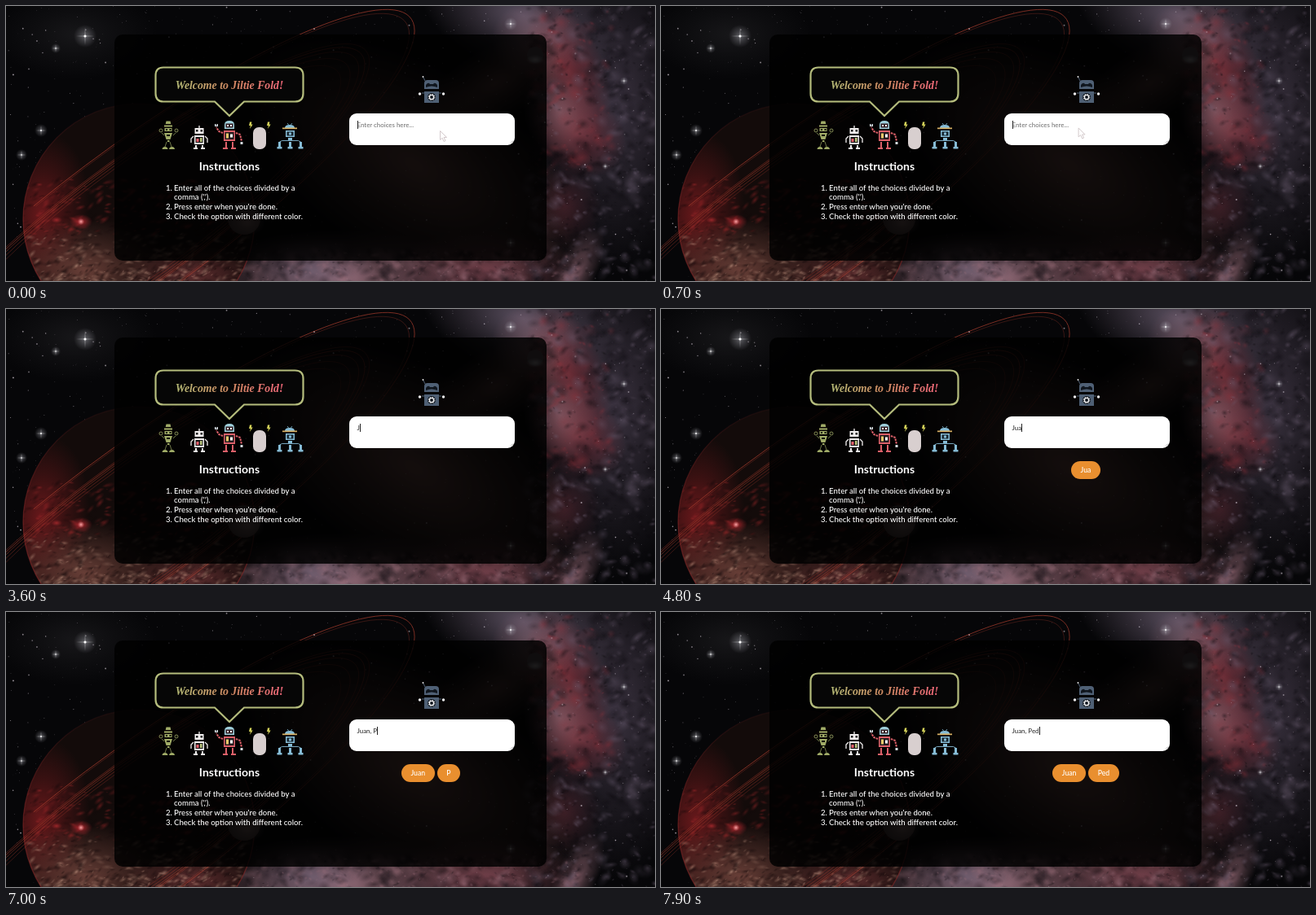
An HTML page with a canvas for the animation above (8000 ms loop, 796 by 338 pixels).

```html
<!DOCTYPE html>
<html lang="en">
<head>
<meta charset="utf-8">
<title>Choice picker</title>
<style>
  html, body { margin: 0; width: 100%; height: 100%; overflow: hidden; background: #060608; font-family: Lato, sans-serif; font-weight: 500; }
  canvas, svg, div { position: absolute; }
  canvas, svg { left: 0; top: 0; }
  #input { left: 420.5px; top: 132px; width: 203px; height: 39px; border-radius: 9px; background: #fff; }
  #line { left: 10px; top: 9px; height: 10px; font-size: 7.9px; line-height: 10px; white-space: pre; color: #333; }
  #line.empty { color: #777; }
  #caret { top: 9px; width: 1px; height: 10px; background: #222; }
  #pills { left: 421px; top: 187px; width: 200px; display: flex; justify-content: center; gap: 3px; }
  #pills span { padding: 0 11.6px; border-radius: 11px; background: #e98f2f; color: #fff; font-size: 8.7px; line-height: 22px; }
</style>
</head>
<body>
<canvas id="sky" width="796" height="338"></canvas>
<svg width="796" height="338" fill="#fff">
  <defs>
    <linearGradient id="title" gradientUnits="userSpaceOnUse" x1="207" x2="341">
      <stop stop-color="#b3ba75"/><stop offset=".5" stop-color="#d08a62"/><stop offset="1" stop-color="#ee6678"/>
    </linearGradient>
  </defs>
  <rect x="133" y="35" width="530" height="278" rx="10" fill="#000" fill-opacity=".84"/>

  <path d="M193 75.500H354.500Q364.500 75.500 364.500 85.500V107.500Q364.500 117.500 354.500 117.500H292L274 135 256 117.500H193Q183.500 117.500 183.500 107.500V85.500Q183.500 75.500 193 75.500Z" fill="#060606" stroke="#b5bd7d" stroke-width="2.200"/>
  <text x="274" y="101.500" text-anchor="middle" font-family="Liberation Serif, serif" font-size="13.8" font-weight="bold" font-style="italic" fill="url(#title)">Welcome to Jiltie Fold!</text>

  <g fill="#a0ab67">
    <path d="M196.500 141.500h5l.8 3.500h-6.600zM194 146.500h10v2h-10zM194.500 150h9v4h-9zM194 156h10l-2.500 8h-5zM198 165h2.500v2h-2.500zM191.500 176q.5-3 3.500-3t3.500 3zM200 176q.5-3 3.500-3t3.500 3z"/>
    <path d="M197 167l-2 6M201 167l2 6M191 156l3 3M208 156l-3 3" stroke="#a0ab67" stroke-width=".7"/>
    <g fill="none" stroke="#a0ab67" stroke-width=".8"><circle cx="190" cy="153" r="2"/><circle cx="209" cy="153" r="2"/></g>
    <path d="M196 151h2v2h-2zM200.500 151h2v2h-2zM197 158h4v2h-4z" fill="#0b0b08"/>
  </g>

  <g fill="#f1eeee">
    <path d="M231.500 150h11v7h-11zM231 159h12v11h-12zM232 171h2v3h1v2h-5v-2h2zM240 171h2v3h2v2h-5v-2h1z"/>
    <path d="M230 160l-3 3v5M244 160l3 3v5M237 147v3" fill="none" stroke="#f1eeee" stroke-width="1.300"/>
    <path d="M233 152h2.500v2.500h-2.500zM238.500 152h2.500v2.500h-2.500zM232.500 161h9v7h-9z" fill="#151515"/>
    <path d="M233.500 163h3v4h-3z" fill="#e8606c"/><path d="M238 162h2.500v5h-2.500z" fill="#b9c47c"/>
  </g>

  <g fill="#dc6069">
    <path d="M268 151v-5q0-5 6-5t6 5v5z" fill="#9fd0dc"/>
    <path d="M269.500 144.500h9v5h-9z" fill="#321c22"/>
    <path d="M271 146h2v2h-2zM275 146h2v2h-2z" fill="#fff"/>
    <path d="M267 153h14v13h-14zM269 167h2v7h-2zM277 167h2v7h-2zM266 174h6v2h-6zM276 174h6v2h-6z"/>
    <path d="M266 156l-5-2-3-5M282 156l5 2 2 8" fill="none" stroke="#dc6069" stroke-width="2" stroke-dasharray="2.500 1"/>
    <path d="M256 148v-3h1.500v2h1v-2h1.500v3zM287.500 167h3v3h-3z" fill="#d4dbe0"/>
    <path d="M268.500 155h11v9h-11z" fill="#231b1e"/><path d="M270 156.500h3v6h-3z" fill="#ebc86a"/><path d="M275 157.500h3v4h-3z" fill="#fff"/>
  </g>

  <rect x="303" y="149" width="16" height="27" rx="7" fill="#d8cfcf"/>
  <path id="bolt" d="M299 142.500h2.500l-.8 3h2l-3.700 5.500 1-4h-2z" fill="#d6d45a"/>
  <use href="#bolt" x="22"/>

  <g fill="#86bcd6">
    <path d="M342 150q0-4 6-4t6 4zM343 153h11v8h-11zM346 162h5v3h-5z"/>
    <path d="M339 149.500h18v1.700h-18z" fill="#d8b064"/>
    <path d="M345 144l2 2.500M351 144l-2 2.500" stroke="#86bcd6" stroke-width=".8"/>
    <path d="M344.500 154.500h8v5h-8z" fill="#16242d"/><circle cx="348.500" cy="157" r="1.700"/>
    <path d="M335.500 167l3-1.500h20l3 1.500" fill="none" stroke="#86bcd6" stroke-width=".9"/>
    <path id="wheel" d="M334 167h3v6h1.500v2.500h-6v-2.500h1.500z"/><use href="#wheel" x="13"/><use href="#wheel" x="26"/>
  </g>

  <text x="274" y="202" text-anchor="middle" font-size="14" font-weight="bold">Instructions</text>
  <g font-size="9.600">
    <text x="196" y="226.600">1.</text><text x="206" y="226.600">Enter all of the choices divided by a</text>
    <text x="206" y="238.300">comma (',').</text>
    <text x="196" y="250">2.</text><text x="206" y="250">Press enter when you're done.</text>
    <text x="196" y="261.700">3.</text><text x="206" y="261.700">Check the option with different color.</text>
  </g>

  <g fill="#4f6075">
    <path d="M513 95q0-4 4-4h10q4 0 4 4v7h-18z"/>
    <path d="M515 100v-3q3-4 5-1h4q2-3 5 1v3q-7-3-14 0z" fill="#10161e"/>
    <path d="M513 105h18v14h-18z"/>
    <circle cx="522" cy="112" r="5" fill="#111820"/>
    <circle cx="522" cy="112" r="2.600" fill="none" stroke="#f4f4f6" stroke-width="1.300"/>
    <circle cx="522" cy="112" r="3.800" fill="none" stroke="#f4f4f6" stroke-dasharray="1.400 1.584"/>
    <path d="M513 107h-3M531 107h3M512 88l2 4" stroke="#4f6075"/>
    <g fill="#f4f4f6"><circle cx="507.500" cy="108" r="1.700"/><circle cx="536.500" cy="108" r="1.700"/><circle cx="511.500" cy="87" r=".9"/></g>
  </g>
</svg>

<div id="input"><div id="line"></div><div id="caret"></div></div>
<svg width="796" height="338">
  <path d="M619 168.500l3-3M621 168.500l1-1" stroke="#888" stroke-width=".6"/>
  <path id="pointer" d="M0 0V11L2.600 8.700 4.600 13 6.500 12.100 4.500 8H8Z" fill="#fff" stroke="#d4cacc"/>
</svg>
<div id="pills"></div>

<script>
const $ = id => document.getElementById(id);
const LOOP = 8000, STEP = 100, BLINK = 530;

// [time typed, delay before the pills follow, content]
const keys = [
  [3600, 200, 'J'], [4200, 100, 'Ju'], [4700, 100, 'Jua'], [4900, 100, 'Juan'],
  [5700, 100, 'Juan,'], [6100, 100, 'Juan, '], [6900, 100, 'Juan, P'],
  [7400, 200, 'Juan, Pe'], [7700, 200, 'Juan, Ped']
];

function paintSky() {
  const c = $('sky').getContext('2d');
  let seed = 11;
  const rnd = () => (seed = seed * 16807 % 2147483647) / 2147483647;
  const range = (a, b) => a + (b - a) * rnd();

  function glow(x, y, rx, ry, rgb, alpha, tilt = 0) {
    const g = c.createRadialGradient(0, 0, 0, 0, 0, 1);
    g.addColorStop(0, `rgba(${rgb},${alpha})`);
    g.addColorStop(.5, `rgba(${rgb},${alpha * .45})`);
    g.addColorStop(1, `rgba(${rgb},0)`);
    c.save();
    c.translate(x, y); c.rotate(tilt); c.scale(rx, ry);
    c.fillStyle = g;
    c.fillRect(-1, -1, 2, 2);
    c.restore();
  }
  function disc(x, y, r, fill) {
    c.beginPath(); c.arc(x, y, r, 0, 7);
    c.fillStyle = fill; c.fill();
  }

  const red = '150,48,58', rose = '158,112,124', mauve = '112,98,118', brown = '135,92,86';
  c.fillStyle = '#060608';
  c.fillRect(0, 0, 796, 338);
  glow(85, 35, 100, 55, '90,88,92', .2);
  glow(635, 12, 130, 70, mauve, .8, .3);
  glow(655, 45, 60, 50, rose, .6, .3);
  glow(745, 120, 110, 210, '72,62,78', .8);
  glow(690, 80, 45, 90, red, .6, -.35);
  glow(700, 155, 65, 50, red, .6, .6);
  glow(680, 130, 45, 60, rose, .6, -.3);
  glow(500, 195, 230, 120, brown, .9, .55);
  glow(600, 95, 100, 45, brown, .6, -.5);
  glow(410, 335, 180, 60, rose, .9);
  glow(375, 325, 80, 40, mauve, .7);
  glow(590, 325, 120, 50, '150,82,96', .7);
  glow(700, 325, 25, 60, rose, .7, .45);
  glow(685, 245, 45, 55, '85,38,48', .6);

  // mottled dust along the right side and the bottom
  for (let i = 0; i < 1300; i++) {
    const low = i % 3 == 0;
    const x = low ? range(290, 700) : range(640, 796), y = low ? range(300, 340) : range(0, 338);
    const r = 2 + 11 * rnd() ** 2;
    const bright = low ? rose : x < 745 && y < 210 && rnd() < .6 ? red : mauve;
    glow(x, y, r, r * range(.4, 1), rnd() < .6 ? '8,6,10' : bright, range(.12, .42), range(-1, 1));
  }

  for (let i = 0; i < 900; i++) {
    const r = rnd() ** 6 * .8 + .35;
    disc(range(0, 796), range(0, 338), r, `rgba(225,215,225,${range(.12, .75)})`);
  }
  for (const [x, y, r] of [[97, 37, 14], [43, 153, 8], [19, 183, 7], [619, 22, 8], [758, 92, 5], [619, 291, 7], [61, 52, 6], [735, 197, 4]]) {
    glow(x, y, r, r, '205,205,215', .4);
    glow(x, y, r, .8, '255,255,255', .7);
    glow(x, y, .8, r, '255,255,255', .7);
    disc(x, y, r / 9, '#fff');
  }

  // planet: dark above, red and clouded below
  const px = 163, py = 262, pr = 142;
  c.save();
  disc(px, py, pr, '#130b0a');
  c.clip();
  glow(42, 255, 60, 100, '130,28,32', .75, .1);
  glow(95, 325, 105, 65, '125,75,66', .8);
  glow(230, 330, 90, 40, '125,60,62', .7);
  for (let i = 0; i < 1000; i++) {
    const x = range(20, 295), y = 338 - 125 * rnd() ** 1.5, r = range(1, 5);
    const light = y > 280 ? '190,145,125' : '155,38,40';
    glow(x, y, r * 1.6, r * .7, rnd() < .55 ? '16,6,7' : light, range(.15, .5), range(-1, .3));
  }
  glow(92, 265, 14, 9, '225,45,55', .7);
  glow(92, 265, 4, 4, '255,175,175', .9);
  glow(62, 263, 7, 4, '210,50,55', .6);
  c.restore();
  const rim = c.createLinearGradient(0, 120, 0, 260);
  rim.addColorStop(0, 'rgba(130,40,38,.1)');
  rim.addColorStop(1, 'rgba(150,42,42,.5)');
  c.beginPath(); c.arc(px, py, pr, 0, 7);
  c.strokeStyle = rim; c.lineWidth = 1.3; c.stroke();

  // the widest rings show only at their far end
  for (const [rx, alpha, reach] of [[415, .7, 1.8], [407, .3, 1.8], [347, .4, 3.2], [340, .6, 3.2], [331, .45, 3.2], [318, .4, 3.2], [304, .3, 3.2]]) {
    c.beginPath(); c.ellipse(px, py, rx, rx * .222, -.637, -reach, reach);
    c.strokeStyle = `rgba(172,62,46,${alpha})`; c.lineWidth = 1; c.stroke();
  }

  disc(292, 261, 20, '#4d3e3e');
  glow(296, 266, 22, 16, '170,140,135', .6);
  disc(649, 60, 10, '#5c5258');
  glow(649, 66, 11, 6, '200,190,195', .8);
}

let drawn = '';
function showPills(text) {
  if (text === drawn) return;
  drawn = text;
  $('pills').replaceChildren(...text.split(',').map(s => s.trim()).filter(Boolean).map(s => {
    const pill = document.createElement('span');
    pill.textContent = s;
    return pill;
  }));
}

function draw(now) {
  const t = Math.floor(now % LOOP / STEP) * STEP;
  const key = keys.findLast(k => t >= k[0]);
  const pillKey = keys.findLast(k => t >= k[0] + k[1]);
  const line = $('line');
  line.className = key ? '' : 'empty';
  line.textContent = key ? key[2] : 'Enter choices here...';
  showPills(pillKey ? pillKey[2] : '');

  const idle = key ? t - key[0] : t + 500;
  $('caret').style.visibility = Math.floor(idle / BLINK) % 2 ? 'hidden' : 'visible';
  $('caret').style.left = 10 + (key ? line.getBoundingClientRect().width : 0) + 'px';

  const slide = t < 900 ? Math.exp(-t / 320) : 0;
  $('pointer').setAttribute('transform', `translate(${509.5 + 23 * slide} ${149.5 + 4 * slide})`);
  $('pointer').style.visibility = key ? 'hidden' : 'visible';
}

paintSky();
const start = performance.now();
(function tick() {
  draw(performance.now() - start);
  requestAnimationFrame(tick);
})();
</script>
</body>
</html>
```
